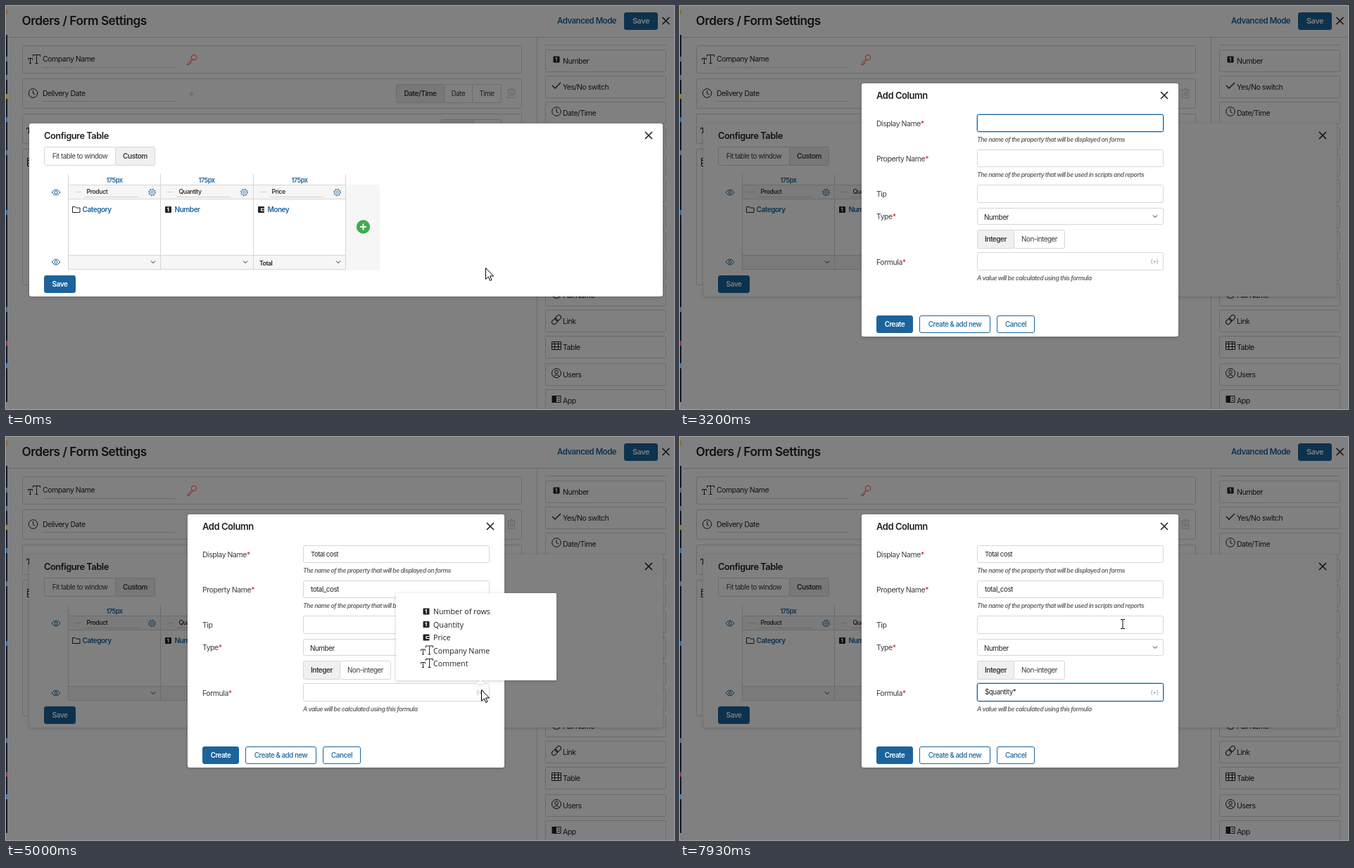
Recreate the animation shown at these times as an HTML page. Size 949 by 573 pixels, loop 8000 ms.

```html
<!DOCTYPE html>
<html lang="en">
<head>
<meta charset="utf-8">
<title>Add a formula column</title>
<style>
  html, body { margin: 0; width: 100%; height: 100%; overflow: hidden; background: #808080; }
  svg {
    display: block; width: 949px; height: 573px;
    font-family: Inter, sans-serif; letter-spacing: -.0286em;
    --bg: #fff; --ink: #222; --label: #3c3c3c; --line: #d6d6d6; --soft: #f6f6f6;
    --active: #f0f0f0; --faint: #d0d0d0; --blue: #1b649b; --on: #fff;
  }
  .dim {
    --bg: #808080; --ink: #111; --label: #1e1e1e; --line: #6b6b6b; --soft: #7b7b7b;
    --active: #787878; --faint: #686868; --blue: #0d324e; --on: #808080;
  }
  text { fill: var(--ink); white-space: pre; }
  .bold { font-weight: 600; }
  .mid { font-weight: 500; }
  .blue { fill: var(--blue); }
  .on { fill: var(--on); }
  .label { fill: var(--label); }
  .faint { fill: var(--faint); }
  .hint { font-style: italic; font-weight: 600; fill: #666; }
  .alt { font-family: "Open Sans", sans-serif; letter-spacing: 0; }
  .c { text-anchor: middle; }
  .shadow { filter: drop-shadow(0 1px 2px rgba(0, 0, 0, .2)); }
</style>
</head>
<body>
<svg id="stage" viewBox="0 0 949 573"></svg>
<script>
const INK = 'var(--ink)', LINE = 'var(--line)', BLUE = 'var(--blue)', BG = 'var(--bg)';
const SOFT = 'var(--soft)', ACTIVE = 'var(--active)', FAINT = 'var(--faint)';

// Drawing helpers
const text = (x, y, str, size = 10.5, cls = '') =>
  `<text x="${x}" y="${y}" font-size="${size}" class="${cls}">${str}</text>`;
const rect = (x, y, w, h, fill = 'none', stroke = 'none', r = 0, extra = '') =>
  `<rect x="${x}" y="${y}" width="${w}" height="${h}" rx="${r}" fill="${fill}" stroke="${stroke}" ${extra}/>`;
const path = (d, stroke = INK, fill = 'none', width = 1) =>
  `<path d="${d}" stroke="${stroke}" fill="${fill}" stroke-width="${width}"/>`;
const circle = (x, y, r, stroke = INK, fill = 'none', extra = '') =>
  `<circle cx="${x}" cy="${y}" r="${r}" stroke="${stroke}" fill="${fill}" ${extra}/>`;
const group = (id, body, cls = '') => `<g id="${id}" class="${cls}">${body}</g>`;
const box = (x, y, w, h, fill = 'none', stroke = LINE, r = 2) =>
  rect(x + .5, y + .5, w - 1, h - 1, fill, stroke, r);

// Icons, placed by their centre
const cross = (x, y) => path(`M${x - 5} ${y - 5}l10 10m0-10l-10 10`, INK, 'none', 1.6);
const chevron = (x, y) => path(`M${x - 3} ${y - 1.5}l3 3l3-3`, INK);
const one = (x, y) => rect(x - 4.5, y - 4.5, 9, 9, INK, 'none', 1) +
  path(`M${x - 1.5} ${y - 1.5}l1.7-1v5.2`, BG, 'none', 1.2);
const money = (x, y) => rect(x - 4.5, y - 4.5, 9, 9, INK, 'none', 1) +
  rect(x - .5, y - 2, 5, 4, BG) + rect(x + .8, y - 1, 3.7, 2, INK);
const letters = (x, y) =>
  path(`M${x - 1.5} ${y - 4}v-2.500h10v2.500m-5-2.500v12m-2 0h4M${x - 8.5} ${y + .5}v-2h6v2m-3-2v7m-1.500 0h3`);
const clock = (x, y) => circle(x, y, 6.3) + path(`M${x} ${y - 4}v4.5l3 1.5`);
const eye = (x, y) => path(`M${x - 6} ${y}q6-8 12 0q-6 8-12 0z`, BLUE) + circle(x, y, 2, BLUE);
const gear = (x, y) => circle(x, y, 4.9, BLUE, 'none', 'stroke-dasharray="1.6 2.25"') +
  circle(x, y, 4, BLUE, 'none', 'stroke-width=".8"') + circle(x, y, 1.6, BLUE, 'none', 'stroke-width=".8"');
const folder = (x, y) => path(`M${x - 5} ${y + 4}v-8h4l1.5 1.5h5v6.500z`);
const trash = (x, y) => path(`M${x - 6} ${y - 4.500}h12m-8 0v-2h4v2m-6.500 0v11h9v-11m-6.500 2.500v6m2 0v-6m2 0v6`, FAINT);
const check = (x, y) => path(`M${x - 6} ${y}l4 4l8-8`, INK, 'none', 1.3);
const link = (x, y) => `<g transform="rotate(-45 ${x} ${y})">` +
  rect(x - 8, y - 3, 9, 6, 'none', INK, 3) + rect(x - 1, y - 3, 9, 6, 'none', INK, 3) + '</g>';
const grid = (x, y) => path(`M${x - 6.5} ${y - 5.5}h13v11h-13zm0 3h13m-13 4h13m-9-7v11m5 0v-11`);
const user = (x, y) => circle(x, y, 6.5) + circle(x, y - 1.5, 2.3) + path(`M${x - 4} ${y + 4.800}q4-5 8 0`);
const app = (x, y) => rect(x - 6, y - 4.5, 12, 9, 'none', INK) + rect(x - 6, y - 4.5, 6, 9, INK) +
  path(`M${x + 1.5} ${y - 1.5}h3m0 3h-3`);

// Widgets
const segments = (x, y, h, widths, labels, active, size = 9.8) => labels.map((label, i) => {
  const left = x + (i ? widths[0] - 1 : 0) + (i > 1 ? widths[1] - 1 : 0);
  const on = i === active;
  return box(left, y, widths[i], h, on ? ACTIVE : BG) +
    text(left + widths[i] / 2, y + h / 2 + 3.5, label, on ? size + .2 : size, on ? 'c bold label' : 'c label');
}).join('');
const button = (x, y, w, h, label, size, solid = true) =>
  box(x, y, w, h, solid ? BLUE : BG, BLUE, 2.5) +
  text(x + w / 2, y + h / 2 + 3.5, label, size, solid ? 'c bold on' : 'c mid blue');
const field = (y, h, id = '') => box(422, y, 265, h, BG, LINE, 2) +
  (id && group(id, box(421, y - 1, 267, h + 2, 'none', '#a9cbe3', 3) + box(422, y, 265, h, 'none', BLUE, 2)));

function page() {
  const side = [['Number', one], ['Yes/No switch', check], ['Date/Time', clock], , , , , , ,
    ['Full Name', user], ['Link', link], ['Table', grid], ['Users', user], ['App', app]];
  let out = rect(0, 0, 949, 573, BG) + rect(0, 41, 2, 522, '#101b2b');
  [[5, '#8a6d1c'], [72, '#536b86'], [98, '#536b86'], [125, '#a07a20'], [158, '#2d6fa8'], [205, '#536b86'],
    [290, '#2d6fa8'], [428, '#536b86'], [476, '#8c3550'], [508, '#4a7ba6']]
    .forEach(([y, fill]) => out += rect(0, y, 2, 7, fill));
  out += text(22.5, 27, 'Orders / Form Settings', 17.2, 'bold') + text(783, 25, 'Advanced Mode', 11.4, 'bold blue') +
    button(878, 9, 48, 25, 'Save', 11) + cross(937.5, 21) + path('M2 44.5H949M754.5 44.5V573M766 55.500H938', LINE);
  [[56, 40], [103, 43], [153, 43], [203, 194]].forEach(([y, h]) => out += box(23, y, 710, h));
  out += letters(40, 76) + text(52, 79, 'Company Name') + path('M52 87.500H240M52 135.500H240', LINE) +
    clock(38.5, 124) + text(52, 128, 'Delivery Date') + text(260, 133, '*', 15, 'faint') +
    circle(267, 73, 3.700, '#8e2a22') + path('M264.500 75.500l-7 6.500v1.500h3v-2h2v-2l3-3', '#8e2a22') +
    segments(554, 111, 27, [69, 41, 42], ['Date/Time', 'Date', 'Time'], 0) + trash(718, 124) +
    rect(618, 161, 48, 12, ACTIVE) + box(618, 161, 86, 26) + letters(38, 175) + grid(37, 222);
  for (let i = 0; i < 14; i++) {
    const y = 62 + 37 * i + (i > 11 ? 2 : 0);
    out += box(766, y, 172, 32);
    if (side[i]) out += side[i][1](782, y + 14) + text(791, y + 20, side[i][0]);
  }
  return out;
}

function tableModal() {
  const columns = [['Product', 'Category', folder], ['Quantity', 'Number', one], ['Price', 'Money', money]];
  let out = rect(33, 167, 900, 246, BG, 'none', 3, 'class="shadow"') +
    text(54, 189, 'Configure Table', 12.8, 'bold') + cross(913, 184) +
    segments(54, 200, 27, [102, 57], ['Fit table to window', 'Custom'], 1) +
    rect(483, 254, 48, 122, SOFT, 'none', 3) + rect(88, 254, 395, 20, SOFT) + rect(88, 354, 395, 21, SOFT) +
    path('M88 254.500H483M88 274.500H483M88 354.500H483M88 374.500H483', LINE) +
    eye(71, 265) + eye(71, 364);
  columns.forEach(([name, type, icon], i) => {
    const x = 88 + Math.round(131.3 * i);
    out += path(`M${x + .5} 239V375`, LINE) + text(x + 66, 251, '175px', 9.2, 'c bold blue') +
      path(`M${x + 10} 264.500h9M${x + 24} 271.500h76`, FAINT) + text(x + 26.5, 267, name, 8.8, 'mid') +
      gear(x + 119.500, 265) + icon(x + 11.500, 289.500) + text(x + 20.5, 293, type, 10, 'bold blue') + chevron(x + 121, 364);
  });
  return out + path('M482.500 239V375', LINE) + text(360, 369, 'Total', 8.7, 'bold') +
    circle(507.5, 314, 9.7, 'none', '#3fac4c') + path('M503 314h9m-4.500-4.500v9', '#fff', 'none', 2) +
    button(54, 383, 45, 25, 'Save', 10);
}

const menu = () => rect(471, 245, 59, 53, '#fff', 'none', 2, 'class="shadow"') +
  rect(471, 272, 59, 26, ACTIVE, 'none', 0, 'id="pressed"') +
  text(482, 262, 'Data', 10.1, 'alt') + text(482, 288, 'Formula', 10.1, 'alt');

function dialog() {
  const label = (y, str, star = '<tspan fill="#d9221c">*</tspan>') => text(279, y, str + star, 10.5, 'label');
  return rect(258, 110, 450, 360, '#fff', 'none', 3, 'class="shadow"') +
    text(279, 132, 'Add Column', 13, 'bold') + cross(688, 127) +
    label(171, 'Display Name') + label(221, 'Property Name') + label(271, 'Tip', '') + label(303, 'Type') + label(368, 'Formula') +
    field(154, 25, 'nameFocus') + field(204, 25) + field(254, 26) + field(287, 24) + field(350, 26, 'formulaFocus') +
    text(422, 193, 'The name of the property that will be displayed on forms', 8.6, 'hint') +
    text(422, 243, 'The name of the property that will be used in scripts and reports', 8.6, 'hint') +
    text(422, 390, 'A value will be calculated using this formula', 8.6, 'hint') +
    text(432, 304, 'Number', 9.9) + chevron(675, 299) +
    segments(422, 318, 27, [53, 73], ['Integer', 'Non-integer'], 0) +
    text(674, 366, '{+}', 8.5, 'c').replace('<text', '<text style="fill:#999"') +
    button(279, 440, 52, 25, 'Create', 9.7) + button(340, 440, 101, 25, 'Create &amp; add new', 9.8, false) +
    button(450, 440, 54, 25, 'Cancel', 9.9, false) +
    group('nameText', text(433, 170, 'Total cost', 9.5)) + group('propertyText', text(433, 220, 'total_cost', 9.8)) +
    '<text id="formulaText" x="433" y="366" font-size="9.8"></text>' +
    rect(433, 160, 1, 13, '#000', 'none', 0, 'id="caret"');
}

function picker() {
  const rows = [['Number of rows', one], ['Quantity', one], ['Price', money], ['Company Name', letters], ['Comment', letters]];
  return `<g class="shadow">${rect(554, 222, 228, 124, '#fff', 'none', 2)}${path('M668 351l6-5.500l6 5.500z', 'none', '#fff')}</g>` +
    rows.map(([name, icon], i) => {
      const y = 248 + 18.5 * i;
      return icon(icon === letters ? 598 : 597, y) + text(607, y + 4, name, 10.7, 'alt');
    }).join('') + rect(569, 257, 198, 18, 'none', '#000', 2, 'id="picked" stroke-width="2"');
}

const cursors = group('arrow', path('M.5.500V16.500L4.300 13L6.800 18.500L9 17.500L6.600 12H11.500Z', '#000', '#fff')) +
  group('hand', path('M-1.500 1.500Q0-.500 1.500 1.500V8Q4 7 4.500 9Q7 8 7.500 10Q10 9.500 10 12V16Q10 19 8 22H-1Q-3 18-6 13.500Q-5 11-1.500 14Z', '#000', '#fff') +
    path('M1.500 8v4M4.500 9v4M7.500 10v3', '#000')) +
  group('beam', path('M-3-6.500h2.500l.5.500l.5-.500h2.500M0-6V6M-3 6.500h2.500l.5-.500l.5.500h2.500', '#000'));

const stage = document.getElementById('stage');
stage.innerHTML = group('page', page(), 'dim') + group('table', tableModal()) + group('menu', menu()) +
  group('dialog', dialog()) + group('picker', picker()) + group('cursor', cursors);
const $ = id => document.getElementById(id);
const show = (id, on) => { $(id).style.display = on ? '' : 'none'; };

// Pointer stops: step (15 per second), x, y
const stops = [[0, 681, 372], [7, 512, 313], [15, 512, 313], [18, 501, 286], [51, 501, 286], [57, 689, 371],
  [61, 685, 357], [64, 689, 364], [71, 675, 364], [75, 675, 359], [88, 629, 266], [120, 629, 266]];

function pointerAt(step) {
  const i = stops.findIndex(stop => stop[0] > step);
  const [a, b] = [stops[i - 1], stops[i]];
  const p = (step - a[0]) / (b[0] - a[0]);
  const eased = p * p * (3 - 2 * p);
  return [1, 2].map(k => Math.round(a[k] + (b[k] - a[k]) * eased));
}

const blink = (step, since) => (step - since) % 16 < 8;

function render(ms) {
  const step = Math.min(119, Math.floor((ms + 4) * .015));
  const within = (from, to = 120) => step >= from && step < to;
  const [x, y] = pointerAt(step);

  $('table').setAttribute('class', step >= 24 ? 'dim' : '');
  show('menu', within(11, 24));
  show('pressed', step >= 23);
  show('dialog', step >= 24);
  show('nameFocus', step < 73);
  show('nameText', step >= 49);
  show('propertyText', step >= 50);
  show('picker', within(73, 92));
  show('picked', step >= 90);
  show('formulaFocus', step >= 92);
  $('formulaText').textContent = step < 92 ? '' : step < 111 ? '$quantity' : '$quantity*';

  const typedAt = step < 49 ? 24 : step < 92 ? 50 : step < 111 ? 92 : 111;
  show('caret', !within(73, 92) && (within(49, 50) || blink(step, typedAt)));
  $('caret').setAttribute('x', step < 49 ? 433 : step < 111 ? 475 : 480);
  $('caret').setAttribute('y', step < 92 ? 160 : 356);

  const hand = within(7, 11) || within(18, 23) || (within(76, 92) && y < 332);
  show('cursor', !within(32, 52));
  show('hand', hand);
  show('beam', step >= 92);
  show('arrow', !hand && step < 92);
  $('cursor').setAttribute('transform', `translate(${x} ${y})`);
}

const start = performance.now();
function tick() {
  render((performance.now() - start) % 8000);
  requestAnimationFrame(tick);
}
tick();
</script>
</body>
</html>
```
